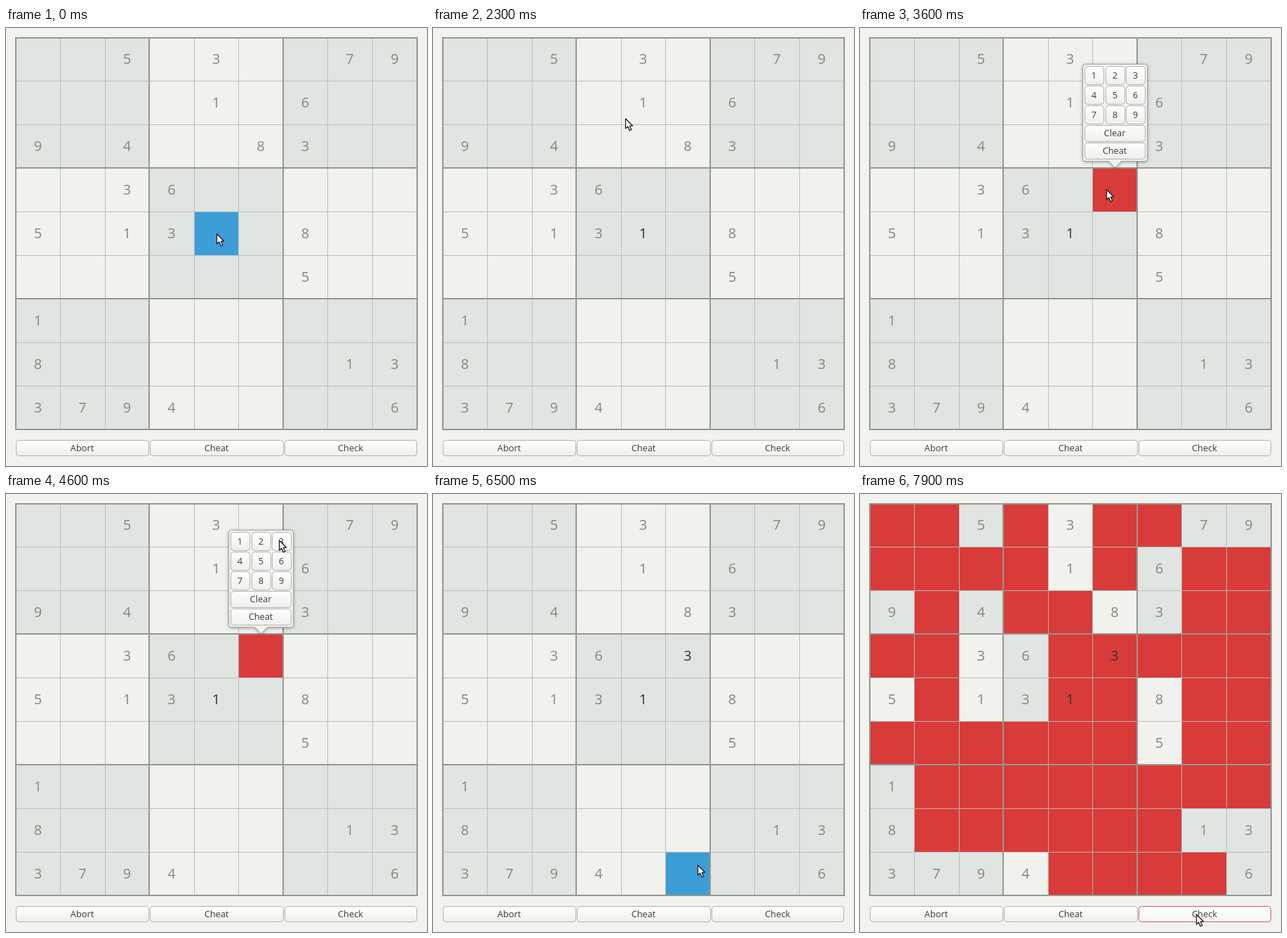
These frames come from a looping animation (600 by 623 pixels, 8000 ms). An HTML page with a canvas:

```html
<!DOCTYPE html>
<html lang="en">
<head>
<meta charset="utf-8">
<title>Sudoku</title>
<style>
html, body { margin: 0; width: 100%; height: 100%; overflow: hidden; background: #f2f2ee; }
canvas { display: block; }
</style>
</head>
<body>
<canvas id="stage" width="600" height="623"></canvas>
<script>
const ctx = document.getElementById('stage').getContext('2d');
const LOOP = 8000, STEP = 100, CHECK = 7900;
const FONT = '"Open Sans", "Noto Sans", sans-serif';
const RED = '#d83b3a', BLUE = '#3d9dd6', RULE = '#939892';

const givens = [
  '..5.3..79', '....1.6..', '9.4..83..',
  '..36.....', '5.13..8..', '......5..',
  '1........', '8......13', '3794....6'
];
// cell and digit picked, with the time its keypad opens and closes
const moves = [
  { row: 4, col: 4, digit: '1', open: 100, close: 2000 },
  { row: 3, col: 5, digit: '3', open: 3500, close: 5300 }
];
// pointer glides: start, end, then the place reached
const home = { x: 301, y: 293 };
const glides = [
  [700, 1300, 259, 109], [1300, 1500, 268, 125], [1900, 2300, 275, 129],
  [2500, 3400, 352, 230], [3600, 4100, 389, 106], [4200, 4600, 390, 66],
  [5200, 5600, 401, 225], [5600, 5900, 376, 433], [5900, 6300, 386, 553],
  [6400, 6500, 378, 528], [6800, 7600, 480, 598]
];
const arrow = new Path2D('M0 0V14L3.2 11.2L5.6 16.8L8.2 15.6L5.8 10.4L10 10Z');

const colX = c => Math.floor(14 + c * 572 / 9);
const rowY = r => Math.floor(14 + r * 557 / 9);
const inside = (p, x, y, w, h) => p.x >= x && p.x < x + w && p.y >= y && p.y < y + h;

function pointerAt(t) {
  let { x, y } = home;
  for (const [from, to, endX, endY] of glides) {
    const k = Math.min(1, Math.max(0, (t - from) / (to - from)));
    const eased = 1 - (1 - k) ** 2;
    x += (endX - x) * eased;
    y += (endY - y) * eased;
  }
  return { x: Math.round(x), y: Math.round(y) };
}

function label(text, x, y, font, color) {
  ctx.font = font + ' ' + FONT;
  ctx.textAlign = 'center';
  ctx.fillStyle = color;
  ctx.fillText(text, x, y);
}

function button(text, x, y, w, h, p, focused) {
  const g = ctx.createLinearGradient(0, y, 0, y + h);
  g.addColorStop(0, '#ffffff');
  g.addColorStop(1, inside(p, x, y, w, h) ? '#f7f7f5' : '#eeeeeb');
  ctx.beginPath();
  ctx.roundRect(x + 0.5, y + 0.5, w - 1, h - 1, 4);
  ctx.fillStyle = g;
  ctx.fill();
  ctx.lineWidth = 1;
  ctx.strokeStyle = focused ? '#d0604a' : '#b2b2ac';
  ctx.stroke();
  label(text, x + w / 2 - 0.5, y + h / 2 + 4.3, '500 12.8px', '#3c3c3a');
}

function popupBox({ row, col }) {
  const mid = Math.floor((colX(col) + colX(col + 1)) / 2);
  return { x: mid - 45.5, y: rowY(row) - 147.5, w: 92, h: 138 };
}

function drawPopup(m, p) {
  const { x, y, w, h } = popupBox(m), cx = x + w / 2, b = y + h, r = 4;
  ctx.beginPath();
  ctx.moveTo(x + r, y);
  ctx.arcTo(x + w, y, x + w, b, r);
  ctx.arcTo(x + w, b, x, b, r);
  ctx.lineTo(cx + 9, b);
  ctx.lineTo(cx, b + 9);
  ctx.lineTo(cx - 9, b);
  ctx.arcTo(x, b, x, y, r);
  ctx.arcTo(x, y, x + w, y, r);
  ctx.closePath();
  ctx.save();
  ctx.shadowColor = 'rgba(0,0,0,.4)';
  ctx.shadowBlur = 5;
  ctx.shadowOffsetY = 1;
  ctx.fillStyle = '#f3f3f0';
  ctx.fill();
  ctx.restore();
  ctx.lineWidth = 1;
  ctx.strokeStyle = '#a2a29d';
  ctx.stroke();
  const left = x + 2.5, top = y + 2.5;
  for (let i = 0; i < 9; i++)
    button(i + 1, left + Math.round(i % 3 * 29.5), top + Math.floor(i / 3) * 28, 28, 27, p);
  button('Clear', left, top + 84, 87, 24, p);
  button('Cheat', left, top + 109, 87, 24, p);
}

function drawCells(t, p, active) {
  const box = active && popupBox(active);
  const covered = box && inside(p, box.x, box.y, box.w, box.h);
  for (let r = 0; r < 9; r++) for (let c = 0; c < 9; c++) {
    const x = colX(c), y = rowY(r), w = colX(c + 1) - x, h = rowY(r + 1) - y;
    const given = givens[r][c] !== '.';
    const move = moves.find(m => m.row === r && m.col === c);
    const shaded = (Math.floor(r / 3) + Math.floor(c / 3)) % 2 === 0;
    let fill = shaded ? '#e0e5e1' : '#f1f1ed';
    if (!given) {
      if (t >= CHECK || (active && move === active)) fill = RED;
      else if (!covered && inside(p, x, y, w, h)) fill = BLUE;
    }
    ctx.fillStyle = fill;
    ctx.fillRect(x, y, w, h);
    const tx = x + w / 2, ty = y + h / 2 + 6.6;
    if (given) label(givens[r][c], tx, ty, '20px', '#87867f');
    else if (move && t >= move.close) label(move.digit, tx, ty, '500 20px', '#343432');
  }
}

function drawLines() {
  const rule = (i, width) => {
    ctx.fillRect(colX(i) + 1 - width, 14, width, 557);
    ctx.fillRect(14, rowY(i) + 1 - width, 572, width);
  };
  ctx.fillStyle = 'rgba(182,188,183,.92)';
  for (let i = 1; i < 9; i++) if (i % 3) rule(i, 1);
  ctx.fillStyle = RULE;
  rule(3, 2);
  rule(6, 2);
  ctx.strokeStyle = RULE;
  ctx.lineWidth = 2;
  ctx.strokeRect(14, 14, 572, 557);
}

function drawPointer(p) {
  ctx.save();
  ctx.translate(p.x - 0.5, p.y);
  ctx.fillStyle = '#fff';
  ctx.fill(arrow);
  ctx.lineWidth = 1.3;
  ctx.lineJoin = 'round';
  ctx.strokeStyle = '#1c1c1c';
  ctx.stroke(arrow);
  ctx.restore();
}

function draw(now) {
  const t = Math.floor(now % LOOP / STEP) * STEP;
  const p = pointerAt(t);
  const active = moves.find(m => t >= m.open && t < m.close);
  ctx.fillStyle = '#f2f2ee';
  ctx.fillRect(0, 0, 600, 623);
  drawCells(t, p, active);
  drawLines();
  button('Abort', 14, 586, 190, 23, p);
  button('Cheat', 205, 586, 191, 23, p);
  button('Check', 397, 586, 189, 23, p, t >= CHECK);
  if (active) drawPopup(active, p);
  drawPointer(p);
}

let start;
function tick(now) {
  start ??= now;
  draw(now - start);
  requestAnimationFrame(tick);
}
draw(0);
requestAnimationFrame(tick);
</script>
</body>
</html>
```
